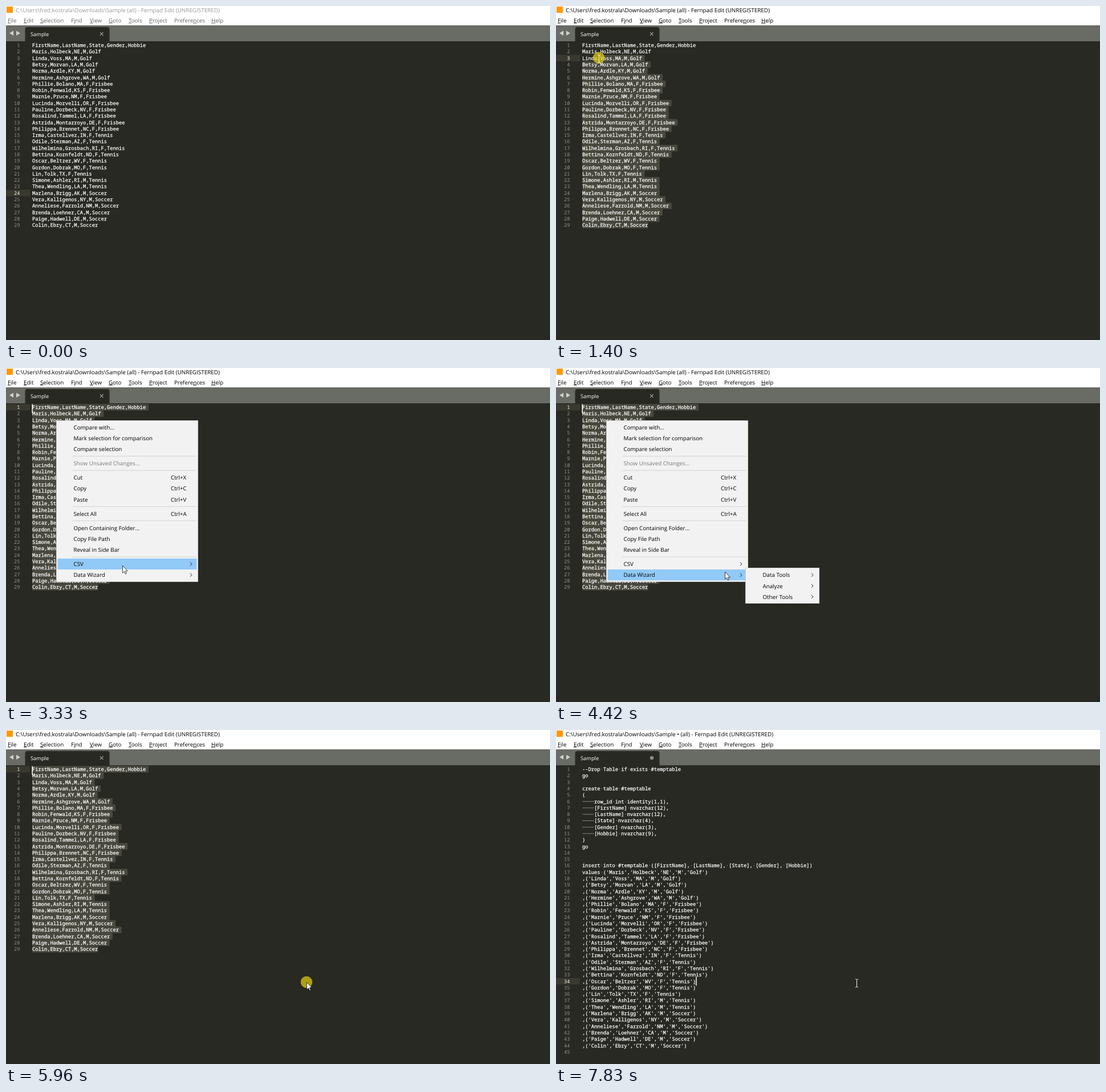
These frames come from a looping animation (954x587 px, 8 s). An HTML page:

```html
<!DOCTYPE html>
<html lang="en">
<head>
<meta charset="utf-8">
<title>Editor</title>
<style>
  html, body { margin: 0; width: 100%; height: 100%; overflow: hidden; background: #282923; }
  svg { display: block; width: 954px; height: 587px; text-rendering: geometricPrecision; }
  text { white-space: pre; }
  .ui { font: 9.75px "Open Sans", "Noto Sans", sans-serif; }
  .code { font: 500 8.745px "Noto Sans Mono", "DejaVu Sans Mono", monospace; fill: #fff; stroke: #fff; stroke-width: .25px; }
  .num { fill: #90918b; stroke: none; text-anchor: end; }
  .num.on { fill: #f8f8f2; }
  .dim { fill: #8f8e84; stroke: #8f8e84; }
  .sel { fill: #49483e; }
</style>
</head>
<body>
<script>
const LOOP = 8000, X0 = 46, TOP = 63.35, LINE = 11.29, CHAR = 5.247;

const people = `Maris,Holbeck,NE,M,Golf
Linda,Voss,MA,M,Golf
Betsy,Morvan,LA,M,Golf
Norma,Ardle,KY,M,Golf
Hermine,Ashgrove,WA,M,Golf
Phillie,Bolano,MA,F,Frisbee
Robin,Fenwald,KS,F,Frisbee
Marnie,Pruce,NM,F,Frisbee
Lucinda,Morvelli,OR,F,Frisbee
Pauline,Dorbeck,NV,F,Frisbee
Rosalind,Tammel,LA,F,Frisbee
Astrida,Montarroyo,DE,F,Frisbee
Philippa,Brennet,NC,F,Frisbee
Irma,Castellvez,IN,F,Tennis
Odile,Sterman,AZ,F,Tennis
Wilhelmina,Grosbach,RI,F,Tennis
Bettina,Kornfeldt,ND,F,Tennis
Oscar,Beltzer,WV,F,Tennis
Gordon,Dobrak,MO,F,Tennis
Lin,Tolk,TX,F,Tennis
Simone,Ashler,RI,M,Tennis
Thea,Wendling,LA,M,Tennis
Marlena,Brigg,AK,M,Soccer
Vera,Kalligenos,NY,M,Soccer
Anneliese,Farrold,NM,M,Soccer
Brenda,Loehner,CA,M,Soccer
Paige,Hadwell,DE,M,Soccer
Colin,Ebry,CT,M,Soccer`.split("\n");

const csv = ["FirstName,LastName,State,Gender,Hobbie", ...people];

const sql = [
  "--Drop Table if exists #temptable", "go", "", "create table #temptable", "(",
  "\trow_id int identity(1,1),", "\t[FirstName] nvarchar(12),", "\t[LastName] nvarchar(12),",
  "\t[State] nvarchar(4),", "\t[Gender] nvarchar(3),", "\t[Hobbie] nvarchar(9),", ")", "go", "", "",
  "insert into #temptable ([FirstName], [LastName], [State], [Gender], [Hobbie])",
  ...people.map((p, i) =>
    (i ? ",(" : "values (") + p.split(",").map(v => `'${v}'`).join(",") + ")"),
  ""
];

function el(tag, attrs, parent, text) {
  const e = document.createElementNS("http://www.w3.org/2000/svg", tag);
  for (const k in attrs) e.setAttribute(k, attrs[k]);
  if (text !== undefined) e.textContent = text;
  if (parent) parent.appendChild(e);
  return e;
}
const set = (e, attrs) => { for (const k in attrs) e.setAttribute(k, attrs[k]); };
const show = (e, on) => e.setAttribute("visibility", on ? "visible" : "hidden");
const rect = (x, y, width, height, fill, parent) =>
  el("rect", { x, y, width, height, fill }, parent);
const label = (x, mid, text, fill, parent) =>
  el("text", { x, y: mid + 3.5, class: "ui", fill }, parent, text);
const lineTop = i => TOP + i * LINE;

const svg = el("svg", { viewBox: "0 0 954 587" }, document.body);
rect(0, 0, 954, 587, "#282923", svg);

// Title, menu bar, tab strip
rect(0, 0, 954, 34, "#fff", svg);
rect(1, 1, 11, 11, "#ff9800", svg);
const title = label(17, 7, "", "#999", svg);
title.style.fontSize = "9.87px";
const bar = el("g", {}, svg);
[[3, "&File"], [31, "&Edit"], [60, "&Selection"], [114, "F&ind"], [147, "&View"], [180, "&Goto"],
 [215, "&Tools"], [251, "&Project"], [295, "Prefere&nces"], [360, "&Help"]].forEach(([x, s]) => {
  const [a, b] = s.split("&");
  const t = label(x, 25, a, "inherit", bar);
  el("tspan", { "text-decoration": "underline" }, t, b[0]);
  el("tspan", {}, t, b.slice(1));
});
rect(0, 34, 954, 28, "#696b65", svg);
el("path", { d: "M13 43.5V52L6 47.7ZM18 43.5V52L25 47.7Z", fill: "#d0d1cd" }, svg);
el("path", { d: "M33.5 62V41Q33.5 37 37.5 37H177.5Q181.5 37 181.5 41V62Z", fill: "#282923" }, svg);
label(43, 49, "Sample", "#fff", svg).style.fontSize = "9.3px";
const closeX = el("path", { d: "M165 46.2L170.6 51.8M170.6 46.2L165 51.8", stroke: "#a3a49f", "stroke-width": 1.2 }, svg);
const dirtyDot = el("circle", { cx: 168, cy: 49, r: 3.2, fill: "#8b8c86" }, svg);

// One text buffer with gutter, selection and whitespace marks
function makeDoc(lines) {
  const g = el("g", {}, svg);
  const gutter = rect(0, 0, 42, LINE, "#3a392f", g);
  const sels = lines.map((s, i) =>
    el("rect", { y: lineTop(i), height: LINE + 0.1, rx: 1.5, class: "sel" }, g));
  const nums = lines.map((s, i) => {
    const y = lineTop(i) + 8.7;
    const tab = s[0] === "\t";
    const t = el("text", { x: tab ? X0 + 4 * CHAR : X0, y, class: "code" }, g);
    s.trim().split(" ").forEach((w, k) => {
      if (k) el("tspan", { class: "dim" }, t, "·");
      el("tspan", {}, t, w);
    });
    if (tab) el("path", { d: `M${X0 + .5} ${y - 2.9}h20`, stroke: "#8f8e84", "stroke-width": .9 }, g);
    return el("text", { x: 24.5, y, class: "code num" }, g, i + 1);
  });
  const width = s => s.replace("\t", "    ").length * CHAR;
  return {
    show: on => g.setAttribute("display", on ? "inline" : "none"),
    // Select from (row, col) to the end; a row past the end selects nothing
    update(current, row, col) {
      gutter.setAttribute("y", lineTop(current));
      nums.forEach((n, i) => n.setAttribute("class", i === current ? "code num on" : "code num"));
      sels.forEach((r, i) => {
        const from = i === row ? Math.min(col * CHAR, width(lines[i])) : 0;
        const end = width(lines[i]) + (i < lines.length - 1 ? 4.6 : 0);
        set(r, { x: X0 + from, width: i < row ? 0 : Math.max(0, end - from) });
      });
    }
  };
}
const docA = makeDoc(csv), docB = makeDoc(sql);
const brackets = el("path", { d: "M51.5 446.3h4.5M240.5 446.3h4.5", stroke: "#a6a69e", "stroke-width": 1 }, svg);
const caret = rect(0, 0, 1.5, 15.5, "#f8f8f0", svg);

// Popup menus; rows are [middle, text, shortcut], ">" marks a submenu
function makeMenu(x, y, w, h, keyX, rows, seps = []) {
  const g = el("g", {}, svg);
  el("rect", { x: x + .5, y: y + .5, width: w - 1, height: h - 1, fill: "#f2f2f2", stroke: "#cfcfcf" }, g);
  const hi = rect(x + 2.5, 0, w - 5, 19.2, "#91c9f7", g);
  seps.forEach(s => rect(x + 28, s - .5, w - 31, 1, "#d4d4d4", g));
  rows.forEach(([mid, text, key]) => {
    label(x + 30.5, mid, text, text.startsWith("Show") ? "#7a7a7a" : "#000", g);
    if (key === ">")
      el("path", { d: `M${x + w - 14} ${mid - 3}l3 3l-3 3`, fill: "none", stroke: "#222" }, g);
    else if (key) label(keyX, mid, key, "#000", g);
  });
  return {
    show: on => g.setAttribute("display", on ? "inline" : "none"),
    at: (mx, my) => mx > x + 2 && mx < x + w
      ? rows.findIndex(r => Math.abs(my - r[0]) <= 9.7 && !r[1].startsWith("Show")) : -1,
    light(i) {
      hi.setAttribute("display", i < 0 ? "none" : "inline");
      if (i >= 0) hi.setAttribute("y", rows[i][0] - 9.6);
    }
  };
}
const mainMenu = makeMenu(88, 92, 249, 284, 289, [
  [104, "Compare with..."], [123, "Mark selection for comparison"], [142, "Compare selection"],
  [167.5, "Show Unsaved Changes..."], [192.5, "Cut", "Ctrl+X"], [211.7, "Copy", "Ctrl+C"],
  [231, "Paste", "Ctrl+V"], [256, "Select All", "Ctrl+A"], [281, "Open Containing Folder..."],
  [300, "Copy File Path"], [319.3, "Reveal in Side Bar"], [344.5, "CSV", ">"], [363.7, "Data Wizard", ">"]
], [155, 180, 243.5, 268.5, 332]);
const toolMenu = makeMenu(332, 351, 130, 63, 0,
  [[363.7, "Data Tools", ">"], [383, "Analyze", ">"], [402, "Other Tools", ">"]]);
const lastMenu = makeMenu(457, 390, 217, 62.5, 626,
  [[402, "Convert Py Var to Text"], [421, "Lower Case Sql"], [440.3, "Delimited to SQL Inserts", "Alt+W"]]);

// Pointer
const pointer = el("g", {}, svg);
const halo = el("circle", { r: 10.3, fill: "#e1cd14", "fill-opacity": .72 }, pointer);
const arrow = el("path", {
  d: "M.5 .5V13.2L3.4 10.5L5.3 15L7.3 14.1L5.4 9.8H9.3Z",
  fill: "#fff", stroke: "#111", "stroke-width": .8
}, pointer);
const beam = el("path", {
  d: "M-2 -5H-.5L.5 -4L1.5 -5H3M.5 -4V8M-2 9H-.5L.5 8L1.5 9H3",
  fill: "none", stroke: "#f4f4f0", "stroke-width": 1
}, pointer);

// Screen refreshes: start, end, count
const bursts = [[70, 860, 11], [940, 1710, 11], [1780, 1860, 2], [2010, 2240, 4], [2410, 2560, 3],
  [2940, 3570, 9], [3800, 3880, 2], [4030, 4030, 1], [4180, 4880, 10], [5110, 5720, 9],
  [5890, 6590, 10], [6900, 6970, 2], [7520, 7600, 2], [7830, 7830, 1]];
function snap(t) {
  let out = 0;
  for (const [a, b, n] of bursts) {
    if (t < a) break;
    const dt = (b - a) / (n - 1) || 1;
    out = a + dt * Math.min(n - 1, Math.floor((t - a) / dt + .1));
  }
  return out;
}

const path = [[70, 513, 488], [310, 390, 400], [500, 300, 258], [700, 215, 300], [860, 180, 384],
  [1010, 178, 382], [1180, 140, 260], [1400, 75, 91], [1710, 47, 72], [1860, 42, 69],
  [2010, 52, 73], [2240, 88, 92], [2560, 88, 92], [2940, 94, 100], [3100, 140, 190],
  [3250, 188, 300], [3330, 204, 347], [3450, 200, 360], [3570, 187, 361.5], [4030, 187, 361.5],
  [4180, 204, 361], [4400, 290, 357], [4560, 368, 366], [4700, 403, 385], [4880, 411, 397],
  [5110, 425, 398], [5200, 480, 402], [5340, 527, 419], [5500, 528, 432], [5720, 527, 443]];
function mouse(t) {
  const i = path.findIndex(p => p[0] > t);
  if (i === 0) return path[0].slice(1);
  if (i < 0) return path[path.length - 1].slice(1);
  const [t0, x0, y0] = path[i - 1], [t1, x1, y1] = path[i];
  const k = (t - t0) / (t1 - t0);
  return [Math.round(x0 + (x1 - x0) * k), Math.round(y0 + (y1 - y0) * k)];
}

const clicks = [[940, 2010], [2410, 2480], [3800, 4030], [5890, 6040], [6900, 6970]];
const within = (t, a, b) => t >= a && t < b;

function draw(time) {
  const t = snap(time), [mx, my] = mouse(t);
  const active = t >= 940, done = t >= 6270, cleared = t >= 7520;

  title.textContent = `C:\\Users\\fred.kostrala\\Downloads\\Sample ${done ? "• " : ""}(all) - Fernpad Edit (UNREGISTERED)`;
  title.setAttribute("fill", active ? "#000" : "#999");
  bar.setAttribute("fill", active ? "#000" : "#666");
  show(closeX, !done);
  show(dirtyDot, done);

  docA.show(!done);
  docB.show(done);
  if (!active) docA.update(23, 99, 0);
  else if (t < 1860) {
    const row = Math.max(0, Math.floor((my - TOP) / LINE));
    docA.update(row, row, Math.max(0, Math.round((mx - X0) / CHAR)));
  } else if (!done) docA.update(0, 0, 0);
  else if (cleared) docB.update(33, 99, 0);
  else docB.update(44, 0, 0);

  const row = cleared ? 33 : done ? 44 : 0;
  show(caret, t >= 1860);
  set(caret, { x: cleared ? X0 + 38 * CHAR - .2 : X0 - .7, y: lineTop(row) - (row ? 2 : 0) });
  show(brackets, cleared);

  const open = t < 5960, tools = open && t >= 3800, last = open && t >= 4880;
  mainMenu.show(open && t >= 2560);
  toolMenu.show(tools);
  lastMenu.show(last);
  mainMenu.light(tools ? 12 : t >= 2940 ? mainMenu.at(mx, my) : -1);
  toolMenu.light(last ? 2 : toolMenu.at(mx, my));
  lastMenu.light(lastMenu.at(mx, my));

  pointer.setAttribute("transform", `translate(${mx} ${my})`);
  show(halo, clicks.some(c => within(t, c[0], c[1])));
  show(arrow, within(t, 2010, 7520));
  show(beam, within(t, 70, 2010) || t >= 7830);
}

const start = performance.now();
function tick() {
  draw((performance.now() - start) % LOOP);
  requestAnimationFrame(tick);
}
tick();
</script>
</body>
</html>
```
